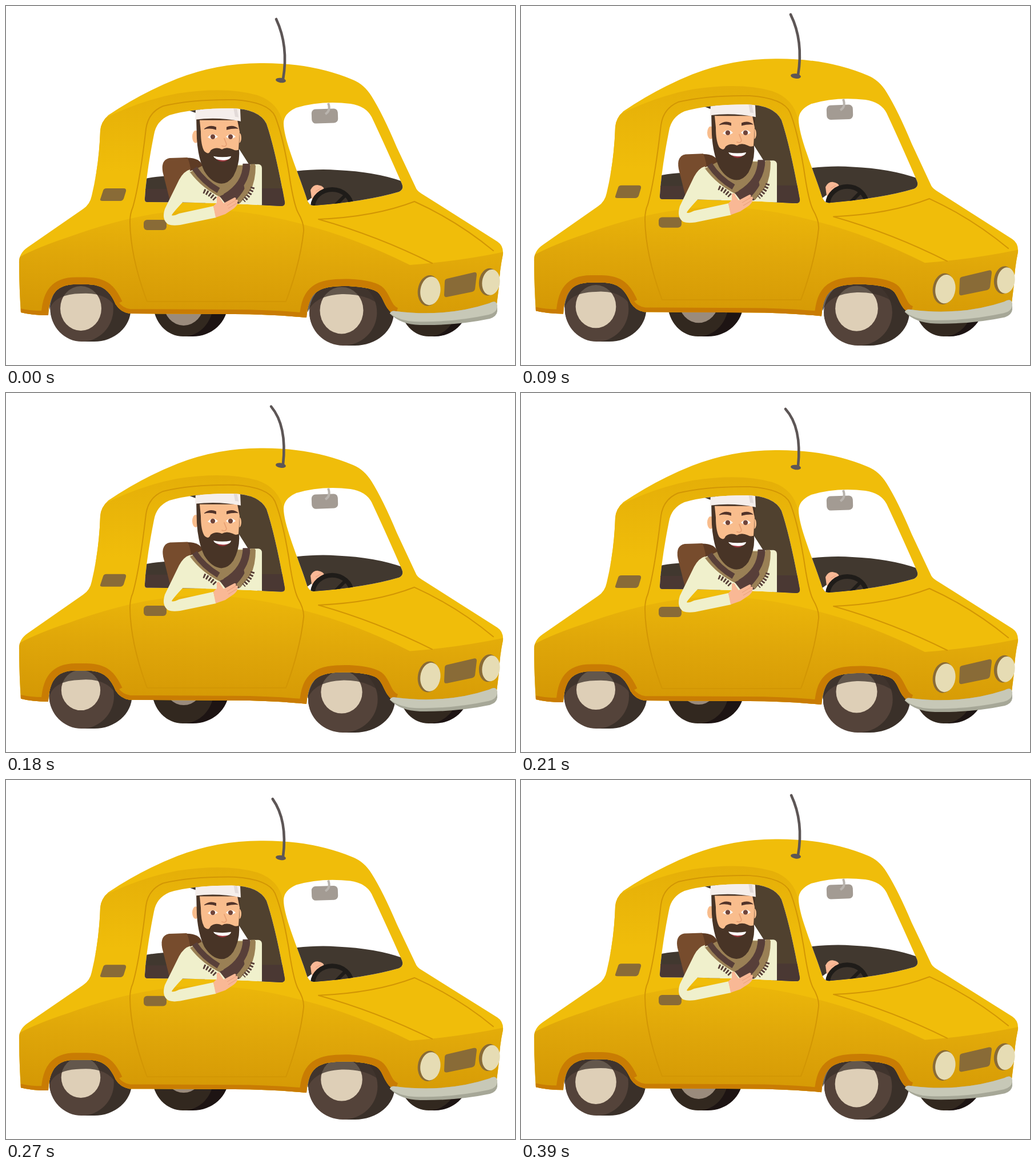
These frames come from a looping animation (891x628 px, 420 ms). An HTML page:

```html
<!DOCTYPE html>
<html lang="en">
<head>
<meta charset="utf-8">
<title>Yellow car</title>
<style>
html, body { margin: 0; width: 100%; height: 100%; overflow: hidden; background: #fff; }
svg { display: block; width: 100%; height: 100%; }
.line { fill: none; stroke: #d29604; stroke-width: 2; stroke-linecap: round; stroke-linejoin: round; }
.trim { fill: #896b37; }
.cream { fill: #f0f0cc; }
.skin { fill: #f9bd8d; }
.hand { fill: #f9b895; }
.hair { fill: #483426; }
.lamp { fill: #e6dcb4; }
.stripe { fill: none; stroke: #583f39; }
</style>
</head>
<body>
<svg viewBox="0 0 891 628">
  <defs>
    <linearGradient id="side" gradientUnits="userSpaceOnUse" x1="330" y1="355" x2="322" y2="540">
      <stop offset="0" stop-color="#ebb60a"/><stop offset=".5" stop-color="#dfa609"/><stop offset="1" stop-color="#d59905"/>
    </linearGradient>
    <linearGradient id="roof" gradientUnits="userSpaceOnUse" x1="0" y1="150" x2="0" y2="290">
      <stop offset="0" stop-color="#e5af08"/><stop offset="1" stop-color="#f0bd0a"/>
    </linearGradient>
    <path id="shell" d="M26 536Q23 490 23 450Q22 433 38 422L135 355Q147 347 150 332Q163 278 165 218Q166 203 179 191Q237 152 300 127Q370 100 445 100Q535 99 607 129Q627 137 640 158Q660 190 684 247L717 317Q719 323 727 328L860 412Q871 419 870 434Q864 462 863 490L858 530Q770 555 682 540C664 534 662 512 652 502Q642 492 600 490C545 489 530 500 526 545Q460 539 400 539L216 538Q200 535 192 522C182 500 172 487 140 487H122C88 487 76 505 74 541Q45 541 26 536Z"/>
    <path id="sideGlass" d="M243 336Q246 290 259 225Q263 201 286 191Q325 179 395 179Q443 180 456 206Q471 250 488 343Q489 350 481 350Q360 343 247 343Q242 343 243 336Z"/>
    <path id="frontGlass" d="M486 205Q486 188 508 178Q552 165 603 171Q630 175 640 194Q665 247 693 311Q697 321 688 325Q630 342 540 349Q531 350 527 339C515 300 486 235 486 205Z"/>
    <clipPath id="inShell"><use href="#shell"/></clipPath>
    <clipPath id="inSide"><use href="#sideGlass"/></clipPath>
    <clipPath id="inFront"><use href="#frontGlass"/></clipPath>
  </defs>

  <g id="wheels"></g>

  <g class="sprung">
    <g fill="#3a2f29" fill-opacity=".75">
      <path d="M76 532Q84 504 131 503Q172 500 190 524L202 534V484H76Z"/>
      <path d="M528 536Q540 506 588 504Q636 503 662 530L680 540V486H528Z"/>
    </g>
    <use href="#shell" fill="#f0bd0a"/>
    <g clip-path="url(#inShell)">
      <path fill="url(#roof)" d="M150 300Q164 240 165 200Q235 165 300 153Q385 140 440 156Q478 169 485 206Q492 250 494 290Z"/>
      <path fill="url(#side)" d="M20 441Q55 422 110 404Q225 362 320 357Q410 352 520 382Q610 405 707 453Q790 447 872 430V560H20Z"/>
      <g fill="none" stroke="#c97c03">
        <path stroke-width="25" d="M74 541C76 505 88 487 122 487H140C172 487 182 500 192 522M526 545C530 500 545 489 600 490Q642 492 652 502C662 512 664 534 682 540"/>
        <path stroke-width="16" d="M24 537Q45 542 74 541M190 522Q200 536 216 538L400 539Q460 539 526 545"/>
      </g>
    </g>

    <use href="#sideGlass" fill="#fff"/>
    <g clip-path="url(#inSide)">
      <path fill="#41382f" d="M240 303Q262 297 300 297V322H240Z"/>
      <path fill="#4a3833" d="M240 320H330V352H240Z"/>
      <path fill="#50412f" d="M408 176H470L492 352H440V300L408 250Z"/>
      <path fill="#4a3833" d="M446 319H492V354H446Z"/>
      <path fill="#41382f" d="M316 181L340 177V190Z"/>
      <g id="seat">
        <path fill="#5e3b24" d="M310 265Q340 262 345 280L350 350H300Z"/>
        <path fill="#774c2d" d="M290 350L275 290Q271 268 287 265L318 264Q330 290 322 350Z"/>
      </g>
      <g class="man">
        <path class="cream" d="M322 287Q350 276 378 276L442 275Q448 276 448 282V356H306Z"/>
        <path fill="#9a8055" d="M322 289L345 277H437Q437 304 428 321L410 343L376 333Q344 318 322 289Z"/>
        <path class="stripe" stroke-width="10" d="M330 282Q346 306 372 321"/>
        <path fill="#583f39" d="M374 331Q398 322 415 305L420 330L408 344H384Z"/>
        <path class="stripe" stroke-width="13" d="M421 274Q421 311 384 333"/>
        <path fill="none" stroke="#9a8055" stroke-width="8" d="M432 275Q433 312 406 340"/>
        <g class="stripe" stroke-dasharray="3 2.5">
          <path stroke-width="8" d="M346 322Q356 326 366 336"/>
          <path stroke-width="7" d="M432 315Q428 328 416 339"/>
        </g>
      </g>
      <g class="man">
        <ellipse class="skin" cx="332" cy="227" rx="6" ry="11"/>
        <ellipse class="skin" cx="408" cy="229" rx="4" ry="9"/>
        <path class="hair" d="M333 190H410L408 250Q410 274 398 296Q389 309 377 309Q360 308 347 287Q336 264 334 230Z"/>
        <path class="skin" d="M339 198H405L409 218L407 250Q401 252 397 249Q386 244 378 249Q367 244 358 251Q355 260 347 252Q341 242 341 218Z"/>
        <path class="hair" d="M378 250Q388 245 398 250Q403 255 404 262L378 266L352 263Q357 249 366 248Q374 247 378 250Z"/>
        <path fill="#9c353b" d="M368 266H390Q379 275 368 266Z"/>
        <path fill="#fff" d="M363 261Q379 264 394 261Q393 268 379 268Q365 267 363 261Z"/>
        <path fill="none" stroke="#e8a174" stroke-width="1.8" stroke-linecap="round" d="M382 230L386 240Q385 246 378 243"/>
        <path fill="#fff" d="M353 228Q362 218 371 227Q362 234 353 228ZM385 227Q394 218 402 227Q393 234 385 227Z"/>
        <g fill="#71453a"><circle cx="362" cy="227" r="4.2"/><circle cx="393" cy="227" r="4.2"/></g>
        <path fill="#52342a" d="M347 213Q357 205 368 210V215Q357 211 347 214ZM386 210Q398 205 407 213Q397 212 386 215Z"/>
        <path fill="#f5eeeb" d="M331 197L333 160H409L411 200Q371 192 331 197Z"/>
        <path fill="#e2dad8" d="M398 176H404L407 193L401 192Z"/>
      </g>
    </g>

    <use href="#frontGlass" fill="#fff"/>
    <g clip-path="url(#inFront)">
      <path fill="#41382f" d="M490 291Q540 284 580 287Q650 290 700 309V352H490Z"/>
      <path fill="#fff" d="M526 342L537 334L549 345L530 354Z"/>
      <path class="hand" d="M535 337L533 322Q537 313 545 313Q557 315 557 321L545 341Z"/>
      <path fill="none" stroke="#e59d7b" d="M542 324L551 319"/>
      <ellipse cx="571" cy="352" rx="34" ry="31" fill="#3d342c" stroke="#1f1c19" stroke-width="8"/>
      <path fill="none" stroke="#1f1c19" stroke-width="6" d="M575 350L597 328"/>
    </g>
    <rect x="535" y="180" width="46" height="25" rx="7" fill="#a39b93" transform="rotate(-2 558 192)"/>
    <path fill="none" stroke="#b9b4ae" stroke-width="4" d="M564 170Q569 183 559 189"/>

    <path class="line" d="M247 517Q218 440 217 378Q217 363 222 352Q234 310 245 215Q249 186 275 175Q325 163 400 164Q460 168 471 193Q484 225 495 290Q503 345 511 361Q522 380 521 394Q515 450 490 517Z"/>
    <path class="line" d="M547 373Q645 369 715 342Q790 376 853 428M547 373Q650 402 746 450"/>
    <path class="trim" d="M165 338L170 323Q171 319 176 319H206Q211 319 210 324L206 337Q204 341 200 341H169Q164 341 165 338Z"/>
    <rect class="trim" x="241" y="374" width="40" height="18" rx="6"/>

    <path class="cream" d="M322 286Q311 289 303 304L278 355Q272 374 284 382Q291 385 305 383L368 370L363 350L303 363Q293 368 290 366Q293 360 320 332Z"/>
    <path class="hand" d="M363 350L369 344L369 334Q373 330 376 338L381 345L400 335Q404 335 402 339Q408 338 405 344Q406 348 399 354L384 364L367 370Z"/>
    <path fill="none" stroke="#e79f7e" d="M387 349L402 340M389 354L404 345"/>

    <path class="trim" d="M772 477L819 466Q824 465 824 470L821 495Q820 499 816 500L772 509Q767 510 767 505L768 482Q768 478 772 477Z"/>
    <g transform="rotate(8 741 497)">
      <ellipse class="trim" cx="740" cy="498" rx="19" ry="27"/><ellipse class="lamp" cx="743" cy="498" rx="17.5" ry="25"/>
    </g>
    <g transform="rotate(8 847 483)">
      <ellipse class="trim" cx="845" cy="483" rx="17" ry="24"/><ellipse class="lamp" cx="849" cy="483" rx="15.5" ry="22.5"/>
    </g>
    <path fill="#a6a797" d="M672 538Q674 532 683 534Q770 545 846 520Q860 512 860 527V534Q859 543 847 547Q790 559 725 558Q690 557 672 538Z"/>
    <path fill="#c7c8b7" d="M672 538Q674 532 683 534Q770 545 846 520Q860 512 860 527Q858 537 845 540Q780 554 715 552Q690 551 672 538Z"/>

    <ellipse cx="481" cy="130" rx="9" ry="4.2" fill="#5d5656" transform="rotate(8 481 130)"/>
    <path id="antenna" fill="none" stroke="#5d5656" stroke-width="4.6" stroke-linecap="round"/>
  </g>
</svg>
<script>
const PERIOD = 420, STEP = 30, GROUND = 765;
const $ = s => document.querySelector(s);
const all = s => [...document.querySelectorAll(s)];

// x, width, top, bottom, face radius, hub x, hub y, hub radius, far side
const wheels = [
  [257, 132, 465, 578, 53, 311, 516, 34, true],
  [690, 119, 470, 578, 50, 742, 512, 30, true],
  [76.5, 143, 473, 587, 56, 131, 524, 35, false],
  [530, 150, 478, 594, 60, 587.5, 527.5, 37, false]
].map(([x, w, top, bottom, r, hx, hy, hr, far]) => {
  const [tread, face, hub] = far ? ['#1d1413', '#32281f', '#9a8b7c'] : ['#3a3029', '#54433a', '#decfb7'];
  const ry = (bottom - top) / 2;
  const g = document.createElementNS('http://www.w3.org/2000/svg', 'g');
  g.innerHTML = `<g><rect x="${x}" y="${top}" width="${w}" height="${ry * 2}" rx="${r + 9}" ry="${ry}" fill="${tread}"/>
    <ellipse cx="${x + r}" cy="${top + ry}" rx="${r}" ry="${ry}" fill="${face}"/></g>
    <ellipse cx="${hx}" fill="${hub}"/>`;
  $('#wheels').append(g);
  return { tyre: g.firstChild, hub: g.lastElementChild, mid: x + w / 2, hy, hr };
});

function draw(now) {
  const a = Math.floor(now % PERIOD / STEP) * STEP / PERIOD * 2 * Math.PI;
  const s = Math.sin(a), c = Math.cos(a), lag = Math.cos(a - .12);

  const k = 1 + .012 * s;
  all('.sprung').forEach(e => e.setAttribute('transform', `matrix(1 0 0 ${k} 0 ${GROUND * (1 - k)})`));
  all('.man').forEach(e => e.setAttribute('transform', `translate(0 ${c + .7})`));
  $('#seat').setAttribute('transform', `translate(${1.5 * s - .5} ${c})`);

  const bend = 3.5 - 5 * c + 1.5 * Math.cos(2 * a);
  $('#antenna').setAttribute('d',
    `M485 128Q${495 - bend * .3} ${70 - bend} ${473 - bend} ${23 + bend * .5}`);

  for (const { tyre, hub, mid, hy, hr } of wheels) {
    const w = 1 - .015 * c;
    tyre.setAttribute('transform', `matrix(${w} 0 0 1 ${mid * (1 - w)} 0)`);
    hub.setAttribute('cy', hy + 5 * lag);
    hub.setAttribute('rx', hr + lag);
    hub.setAttribute('ry', hr + 2 + 2 * lag);
  }
}

// A small lead keeps rounding from showing the previous step.
const start = performance.now() - 5;
(function loop() {
  draw(performance.now() - start);
  requestAnimationFrame(loop);
})();
</script>
</body>
</html>
```
